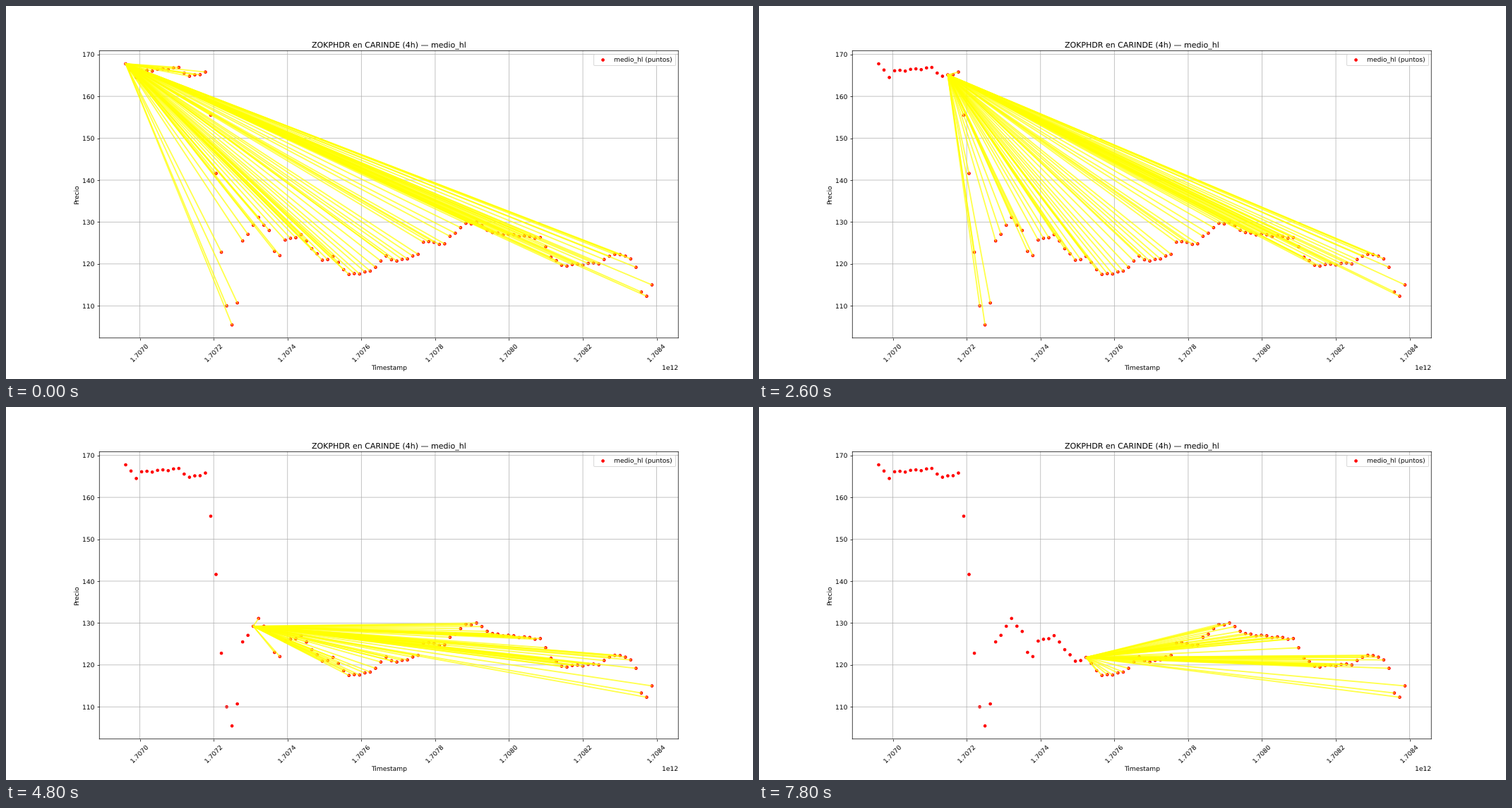
Animation, 1058 px wide and 529 px high, one loop 8000 ms. Source, as a matplotlib script:

```python
import numpy as np
import matplotlib.pyplot as plt
from matplotlib.animation import FuncAnimation
from matplotlib.collections import LineCollection

plt.rcParams["text.hinting"] = "none"

FRAMES = 40
INTERVAL = 200  # ms
COUNT = 100
STEP = 4 * 3600 * 1000  # one 4h candle in ms
START = 118539 * STEP

# Turning points of the price: candle index -> price
TURNS = {
    0: 167.66, 2: 164.7, 3: 166, 10: 166.8, 12: 164.7, 15: 165.7,
    16: 155.4, 17: 141.8, 18: 122.7, 19: 109.9, 20: 105.65, 21: 110.6,
    22: 125.4, 25: 131, 27: 127.9, 28: 122.9, 29: 122.2, 30: 125.6,
    33: 126.9, 37: 120.8, 39: 121.7, 42: 117.4, 46: 118.2, 49: 121.8,
    51: 120.6, 55: 122.2, 56: 125.4, 60: 124.7, 61: 126.5, 64: 129.6,
    66: 129.9, 69: 127.4, 78: 126.2, 80: 121.8, 82: 119.6, 89: 120.2,
    92: 122.5, 95: 121.4, 96: 119.1, 97: 113.2, 98: 112.5, 99: 114.9,
}


def make_points():
    """Straight runs between the turns, with a small dip every third candle."""
    i = np.arange(COUNT)
    trend = np.interp(i, list(TURNS), list(TURNS.values()))
    ripple = 0.2 * np.cos(2 * np.pi * (i - 2) / 3)
    return np.column_stack([START + STEP * i.astype(float), trend - ripple])


points = make_points()

fig, ax = plt.subplots(figsize=(16, 8), dpi=66.125)
# One size per dot keeps the dots at sub-pixel positions
ax.scatter(*points.T, s=np.full(COUNT, 16), color="red",
           label="medio_hl (puntos)")
ax.set_title("ZOKPHDR en CARINDE (4h) — medio_hl")
ax.set_xlabel("Timestamp")
ax.set_ylabel("Precio")
ax.tick_params(axis="x", rotation=45)
ax.grid(True, snap=False)
for spine in ax.spines.values():
    spine.set_snap(False)
ax.legend(loc="upper right")

fan = LineCollection([], colors="yellow", linewidths=2, alpha=0.7,
                     capstyle="projecting", zorder=2)
ax.add_collection(fan, autolim=False)


def update(i):
    """Join point i to every later point."""
    later = points[i + 1:]
    origin = np.broadcast_to(points[i], later.shape)
    fan.set_segments(np.stack([origin, later], axis=1))
    return (fan,)


anim = FuncAnimation(fig, update, frames=FRAMES, interval=INTERVAL,
                     repeat=True, repeat_delay=0, blit=False)
plt.show()
```
